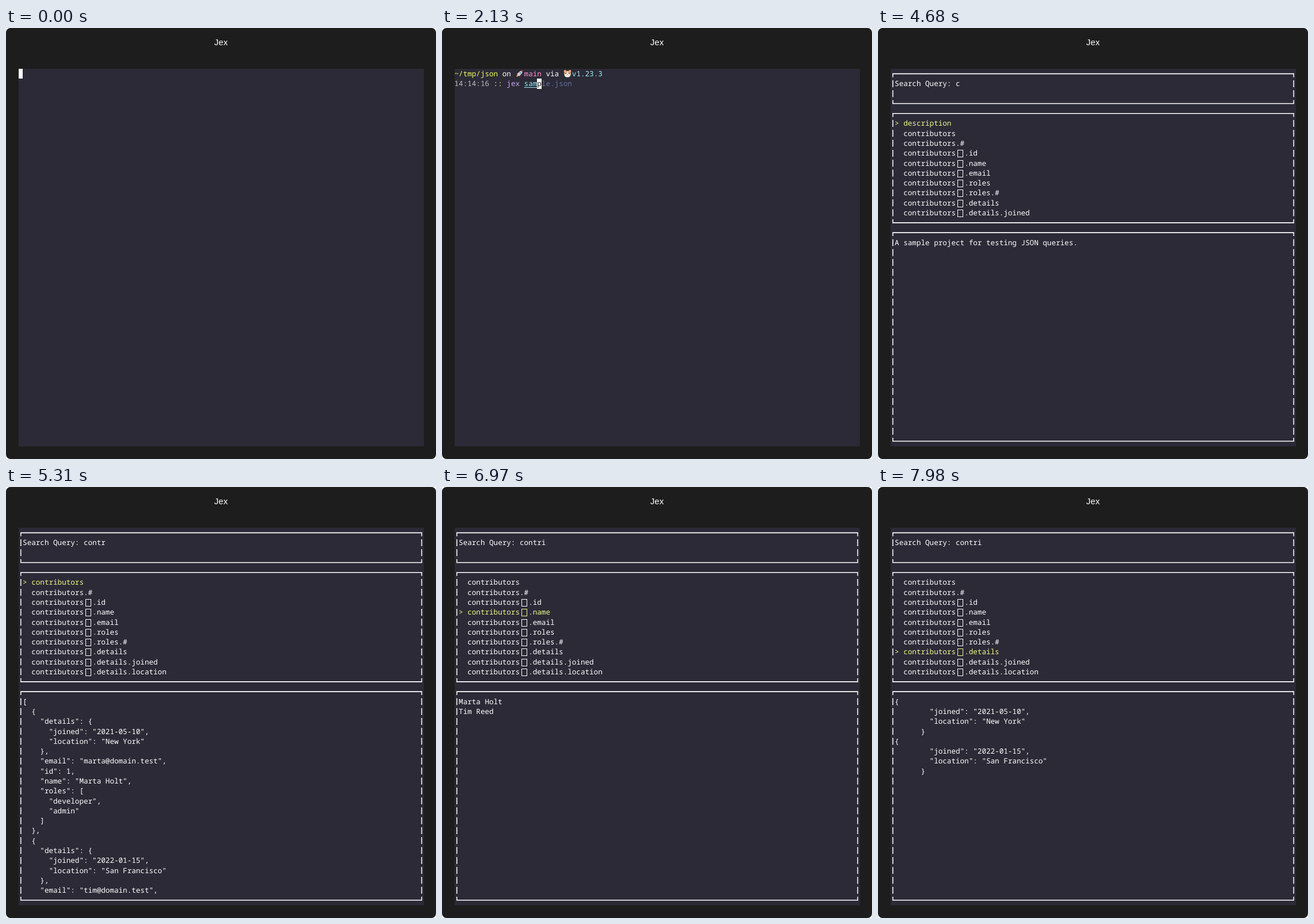
An HTML page that plays this animation: 747x750 px, repeating every 8000 ms.

```html
<!DOCTYPE html>
<html lang="en">
<head>
<meta charset="utf-8">
<title>Jex</title>
<style>
  html, body { margin: 0; width: 100%; height: 100%; overflow: hidden; background: #fff; }
  #win { position: absolute; left: 0; top: 0; width: 747px; height: 750px; border-radius: 8px; background: #1d1d1d; overflow: hidden; }
  #title { position: absolute; left: 0; width: 747px; top: 14px; text-align: center; color: #fff;
    font: 15px/21px "Liberation Sans", Arial, sans-serif; }
  #term { position: absolute; left: 21.5px; top: 71px; width: 704px; height: 657px; background: #2b2a36; }
  #term, .row { font: 12.615px/17.28px "Noto Sans Mono", "DejaVu Sans Mono", monospace;
    text-rendering: geometricPrecision; font-variant-ligatures: none; color: #fff; }
  .row { position: absolute; white-space: pre; height: 17.28px; }
  .cur { position: absolute; width: 7.57px; height: 17.28px; background: #fffff8; color: #111; white-space: pre; }
  .path { color: #f3fb5e; }
  .pick { color: #f1fa8c; }
  .pink { color: #ff92d0; }
  .cyan { color: #9aedfe; }
  .grey { color: #bfbfbf; }
  .cmd { color: #caa9fa; }
  .bad { color: #ff6e67; }
  .hint { color: #6272a4; }
  .file { color: #9aedfe; text-decoration: underline; text-underline-offset: 2px; }
  .pair { position: relative; -webkit-text-fill-color: transparent; }
  .pair::after { content: ""; position: absolute; left: 2.9px; top: 3px; width: 8px; height: 11px; border: 1px solid currentColor; }
  svg { position: absolute; left: 0; top: 0; overflow: visible; }
</style>
</head>
<body>
<div id="win">
  <div id="title">Jex</div>
  <div id="term"></div>
</div>
<script>
const CW = 7.569, RH = 17.28, LOOP = 8000;
const term = document.getElementById('term');

const span = (cls, text) => `<span class="${cls}">${text}</span>`;
const row = (r, c, html, cls = '') =>
  `<div class="row ${cls}" style="left:${c * CW}px;top:${r * RH}px">${html}</div>`;
const cursor = (r, c, ch = '') =>
  `<div class="cur" style="left:${c * CW}px;top:${r * RH}px">${ch}</div>`;

const icons = `<svg width="704" height="18">
  <g transform="translate(112.6 8.6) rotate(45)">
    <path d="M-1.6 4L0 8L1.6 4Z" fill="#ffac33"/>
    <path d="M-2-1L-4.4 3.4L-2 3ZM2-1L4.4 3.4L2 3Z" fill="#c8433c"/>
    <path d="M0-8C3-5 3 0 2 4H-2C-3 0-3-5 0-8Z" fill="#cfd3d8"/>
    <path d="M0-8C1-7 1.7-6 2-5H-2C-1.7-6-1-7 0-8Z" fill="#c8433c"/>
    <circle cy="-2" r="1.2" fill="#4b7ea8"/>
  </g>
  <g transform="translate(196 8.4)">
    <circle cx="-4.2" cy="-4" r="2.3" fill="#e3a06a"/><circle cx="4.2" cy="-4" r="2.3" fill="#e3a06a"/>
    <circle cx="-4.2" cy="-3.8" r="1.1" fill="#f2a3a9"/><circle cx="4.2" cy="-3.8" r="1.1" fill="#f2a3a9"/>
    <ellipse cy=".6" rx="6" ry="5.6" fill="#e8b07c"/>
    <path d="M0-4.5L2 0C6 0 6.4 6.2 0 6.2C-6.4 6.2-6 0-2 0Z" fill="#f7ece2"/>
    <circle cx="-2.7" cy="-.6" r=".9" fill="#3a2b26"/><circle cx="2.7" cy="-.6" r=".9" fill="#3a2b26"/>
    <ellipse cy="1.6" rx="1.1" ry=".8" fill="#e0747c"/>
  </g></svg>`;

// Shell prompt: typed command, greyed completion, cursor place
function shell(typed, full = typed, curRow = 1, curCol = 12 + typed.length) {
  const name = typed.slice(0, 4), arg = typed.slice(4), rest = full.slice(typed.length);
  const line = span(name.length < 3 ? 'bad' : 'cmd', name) + span('file', arg) + span('hint', rest);
  return icons +
    row(0, 0, span('path', '~/tmp/json') + ' on') +
    row(0, 16, span('pink', 'main') + ' via') +
    row(0, 27, 'v1.23.3', 'cyan') +
    row(1, 0, span('grey', '14:14:16') + ' ' + span('path', '::') + ' ' + line) +
    cursor(curRow, curCol, curRow === 1 ? rest[0] : '');
}

function frame(top, bottom) {
  const x1 = CW / 2, x2 = 92.5 * CW, y1 = (top + .5) * RH, y2 = (bottom + .5) * RH;
  return `<path d="M${x1 - .8} ${y1}H${x2 + .8}M${x1 - .8} ${y2}H${x2 + .8}" stroke-width="1.7"/>
    <path d="M${x1} ${y1}V${y2}M${x2} ${y1}V${y2}" stroke-width="1.5" stroke-dasharray="12 5.28" stroke-dashoffset="6"/>`;
}
const frames = `<svg width="704" height="657" fill="none" stroke="#fff">${frame(0, 3) + frame(4, 15) + frame(16, 37)}</svg>`;

const sub = ['.id', '.name', '.email', '.roles', '.roles.#', '.details', '.details.joined', '.details.location'];
const keys = ['name', 'description', 'contributors', 'contributors.#', ...sub.map(s => 'contributors[]' + s)];

// Query view: first visible key, picked line, preview text
function view(query, first, pick, preview) {
  const list = keys.slice(first, first + 10).map((key, i) => {
    const on = i === pick;
    return row(5 + i, 1, (on ? '> ' : '  ') + key.replace('[]', span('pair', '[]')), on ? 'pick' : '');
  });
  const lines = preview.split('\n').slice(0, 20).map((text, i) => row(17 + i, 1, text));
  return frames + row(1, 1, 'Search Query: ' + query) + list.join('') + lines.join('');
}

const people = [
  { details: { joined: '2021-05-10', location: 'New York' }, email: 'marta@domain.test', id: 1,
    name: 'Marta Holt', roles: ['developer', 'admin'] },
  { details: { joined: '2022-01-15', location: 'San Francisco' }, email: 'tim@domain.test', id: 2,
    name: 'Tim Reed', roles: ['designer'] }
];
const each = fn => people.map(fn).join('\n');
const all = JSON.stringify(people, null, 2);
const roles = each(p => JSON.stringify(p.roles).replace(',', ', '));
const details = each(({ details: d }) =>
  `{\n        "joined": "${d.joined}",\n        "location": "${d.location}"\n      }`);

const near = 'jex sample.json', far = 'jex ~/tmp/json/sample.json';
const contri = (pick, preview) => view('contri', 2, pick, preview);

const steps = [
  [0, cursor(0, 0)],
  [20, shell('')],
  [830, shell('j', far)],
  [900, shell('je', far)],
  [1130, shell('jex', far)],
  [1710, shell('jex ', far)],
  [1980, shell('jex s', near)],
  [2050, shell('jex sa', near)],
  [2130, shell('jex sam', near)],
  [2510, shell(near)],
  [3230, shell(near, near, 2, 0)],
  [3250, view('', 0, 0, 'Catalog K')],
  [4680, view('c', 1, 0, 'A sample project for testing JSON queries.')],
  [4760, view('co', 2, 0, all)],
  [4920, view('con', 2, 0, all)],
  [5070, view('cont', 2, 0, all)],
  [5310, view('contr', 2, 0, all)],
  [5590, contri(0, all)],
  [6360, contri(1, '2')],
  [6570, contri(2, each(p => p.id))],
  [6970, contri(3, each(p => p.name))],
  [7170, contri(4, each(p => p.email))],
  [7500, contri(5, roles)],
  [7780, contri(6, each(p => p.roles.length))],
  [7980, contri(7, details)]
];

const start = performance.now();
let shown = -1;
function draw() {
  const t = (performance.now() - start) % LOOP;
  const i = steps.findLastIndex(s => s[0] <= t);
  if (i !== shown) {
    shown = i;
    term.innerHTML = steps[i][1];
  }
  requestAnimationFrame(draw);
}
draw();
</script>
</body>
</html>
```
